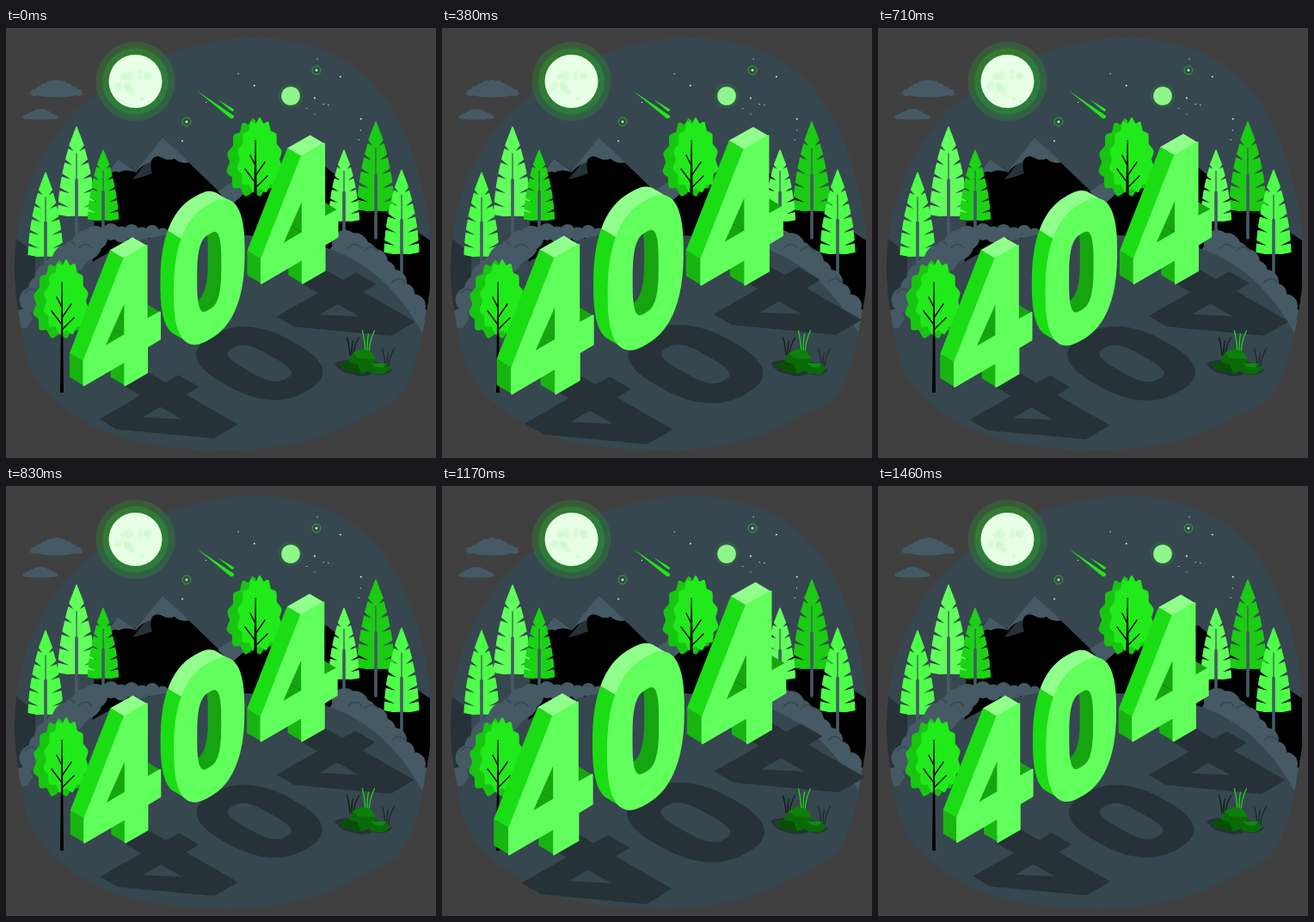
Write an HTML page that moves like this. It is 500x500 px and loops after 1500 ms.

```html
<!DOCTYPE html>
<html lang="en">
<head>
<meta charset="utf-8">
<title>404 night forest</title>
<style>
html, body { margin: 0; width: 100%; height: 100%; overflow: hidden; background: #404040; }
svg { display: block; width: 100vw; height: 100vh; }
</style>
</head>
<body>
<svg id="stage" viewBox="0 0 500 500"></svg>
<script>
const SLATE = '#37474f', MIST = '#455a64', DARK = '#263238';
const FRONT = '#61ff5c', SIDE = '#1bdd14', TOP = '#90ff8c', INNER = '#16a510', END = '#18b512';
const DEPTH = [-16.5, -9.8];
const ISO = 0.577;

const round = v => +v.toFixed(1);
const range = (count, fn) => Array.from({ length: count }, (_, i) => fn(i));
let seed = 7;
const rand = (lo, hi) => {
  seed = seed * 16807 % 2147483647;
  return lo + (hi - lo) * seed / 2147483647;
};

// Shape helpers
const poly = pts => 'M' + pts.map(p => p.map(round).join(' ')).join('L') + 'Z';
const pairs = s => s.split(' ').map(p => p.split(',').map(Number));
const path = (d, fill, extra = '') => `<path d="${d}" fill="${fill}" ${extra}/>`;
const line = (d, color, w) =>
  `<path d="${d}" fill="none" stroke="${color}" stroke-width="${w}" stroke-linecap="round"/>`;
const disc = (x, y, r, fill, extra = '') =>
  `<circle cx="${round(x)}" cy="${round(y)}" r="${round(r)}" fill="${fill}" ${extra}/>`;
const group = (x, y, body) => `<g transform="translate(${x} ${y})">${body}</g>`;

// Closed Catmull-Rom curve
function smooth(pts) {
  const at = i => pts[(i + pts.length) % pts.length];
  return 'M' + at(0) + pts.map((p, i) => {
    const a = at(i - 1), c = at(i + 1), e = at(i + 2);
    return 'C' + [p[0] + (c[0] - a[0]) / 6, p[1] + (c[1] - a[1]) / 6,
      c[0] - (e[0] - p[0]) / 6, c[1] - (e[1] - p[1]) / 6, c[0], c[1]].map(round);
  }).join('') + 'Z';
}

// Numerals: walls run from a front edge back along DEPTH
const wall = (pts, fill) =>
  path(poly([...pts, ...pts.map(p => [p[0] + DEPTH[0], p[1] + DEPTH[1]]).reverse()]), fill);
const face = (d, fill = FRONT) =>
  path(d, fill, `fill-rule="evenodd" stroke="${fill}" stroke-width="1.8" stroke-linejoin="round"`);

const outer = pairs('137,268 163.5,253 163.5,339 179,330.5 179,362 164,371 164,401 138,416 138,388 90,416 90,388');
const hole = pairs('138,317 138,357 114,371');
const fourFace = poly(outer) + poly(hole);

// Skewed superellipse used for both rims of the zero
function rimPoint(rim, deg) {
  const a = deg * Math.PI / 180;
  const bend = v => Math.sign(v) * Math.abs(v) ** (2 / rim.power);
  const x = rim.rx * bend(Math.cos(a));
  return [236.3 + x, 283.5 - ISO * x - rim.ry * bend(Math.sin(a))];
}
const rimArc = (rim, from, to) => range(Math.floor((to - from) / 3) + 1, i => rimPoint(rim, from + i * 3));

// Angle where a rim turns away from the depth direction
function tangent(rim, sign) {
  const reach = deg => {
    const p = rimPoint(rim, deg);
    return sign * (DEPTH[0] * p[1] - DEPTH[1] * p[0]);
  };
  return range(120, i => i * 3).reduce((best, a) => reach(a) > reach(best) ? a : best);
}

const outRim = { rx: 40.5, ry: 78, power: 2.5 }, inRim = { rx: 15, ry: 45, power: 3 };
const zeroFace = poly(rimArc(outRim, 0, 357)) + poly(rimArc(inRim, 0, 357));

function four() {
  return wall(hole.slice(0, 2), INNER) + wall(hole.slice(1), INNER) +
    wall([outer[8], outer[7]], END) + wall([outer[2], outer[3]], INNER) +
    wall([outer[0], outer[10]], SIDE) + wall([outer[10], outer[9]], END) +
    wall([outer[0], outer[1]], TOP) + face(fourFace);
}

function zero() {
  const up = tangent(outRim, 1), low = tangent(outRim, -1);
  return wall(rimArc(inRim, tangent(inRim, -1), tangent(inRim, 1) + 360), INNER) +
    wall(rimArc(outRim, 138, low), SIDE) + wall(rimArc(outRim, up, 138), TOP) + face(zeroFace);
}

// The fronts laid flat on the ground
function shadow() {
  return `<g transform="matrix(.593 -.8107 -.705 -.405 349.4 696.3)">${face(fourFace, DARK)}` +
    group(2.5, -5, face(zeroFace, DARK)) + group(207, -119, face(fourFace, DARK)) + '</g>';
}

// Conifer with slanted cuts, tip at (x, y)
function pine(x, y, h, hw, fill, trunk) {
  const width = u => hw * (0.05 + 0.95 * Math.sin(u * 1.5) ** 0.9);
  const right = range(5, i => {
    const u = (i + 1.3) / 6.3;
    return [[width(u), u * h], [width(u) * 0.18, (u + 0.085) * h], [width(u + 0.04), (u + 0.045) * h]];
  }).flat();
  right.push([hw, h * 0.985], [hw * 0.5, h * 1.005]);
  const left = right.map(p => [-p[0], p[1]]).reverse();
  return group(x, y, path(poly([[0, 0], ...right, [0, h], ...left]), fill,
    `stroke="${fill}" stroke-width="1.2" stroke-linejoin="round"`) +
    line(`M0 ${h * 0.3}V${trunk}`, MIST, 1.3) + line(`M0 ${h * 0.6}V${trunk}`, MIST, 3.6));
}

// Lobed broadleaf tree, crown top at (x, y)
function leafy(x, y, trunk) {
  const lobes = 13;
  const crown = smooth(range(lobes * 4, i => {
    const a = i / (lobes * 4) * 2 * Math.PI;
    const r = 1 + 0.07 * Math.cos(a * lobes);
    const low = (1 - Math.cos(a)) / 2;
    return [32 * r * Math.sin(a) * (0.72 + 0.34 * low), 44 - 43 * r * Math.cos(a)].map(round);
  }));
  return group(x, y, path(crown, '#17c611', 'transform="translate(-3 1)"') +
    path(crown, '#20ea19', 'transform="translate(5 0) scale(.86 .96)"') +
    line('M0 74L-12 58M0 66L11 50M0 54L-6 42M0 80L14 66', '#000', 1.4) +
    path(`M-.4 24H.6L2 ${trunk}H-2Z`, '#000'));
}

function sky() {
  const stars = range(16, i => disc(rand(205, 430), rand(30, 140), i % 3 ? 0.6 : 0.9, '#fff')).join('');
  const rings = [[210, 109], [361, 49]].map(([x, y]) =>
    disc(x, y, 5, 'none', 'stroke="#20b81b"') + disc(x, y, 1.5, '#b5ffb2')).join('');
  return stars + rings + disc(331, 79, 14.5, '#2c8c30', 'opacity=".25"') + disc(331, 79, 10.8, '#8df58a') +
    path('M222 73L265 102Q265.5 106 261 105Z', '#20e619') + path('M246 83L265 94.5Q265 98 262 96.6Z', '#20e619');
}

function moon(x, y) {
  const spots = range(12, () => {
    const a = rand(0, 6.28), d = rand(6, 23);
    return disc(x + d * Math.cos(a), y + d * Math.sin(a), rand(2, 6), '#cdf9cb', 'opacity=".6"');
  }).join('');
  return disc(x, y, 46, '#1fd318', 'opacity=".18"') + disc(x, y, 38.5, '#1fd318', 'opacity=".25"') +
    disc(x, y, 31, '#e6ffe5') + spots;
}

// Row of puffs that thins toward both ends
function cloud(x, y, w, h) {
  const puffs = range(9, i => {
    const u = (i + 1) / 10, r = h * (0.13 + 0.2 * Math.sin(u * Math.PI));
    return disc(x + u * w, y + h * (0.75 - 0.42 * Math.sin(u * Math.PI) ** 2), r, MIST);
  }).join('');
  return puffs + path(`M${x} ${y + h * 0.8}Q${x + w / 2} ${y + h * 0.2} ${x + w} ${y + h * 0.8}Q${x + w / 2} ${y + h * 1.15} ${x} ${y + h * 0.8}Z`, MIST);
}

function mountains() {
  return path('M100 290L104 185L130 152L152 167L182 127L262 204L285 182L372 162L410 192L493 247V345L380 275Z', '#000') +
    path('M108 181L130 152L153 168Q138 163 131 168Q122 163 108 181Z', MIST) +
    path('M147 176L172 146Q166 160 170 169Q158 174 147 176Z', DARK) +
    path('M147 172L182 127L213 156Q204 159 196 152Q188 155 182 151Q172 146 168 156Q156 160 147 172Z', MIST) +
    path('M246 190L268 176L300 172L262 206Z', MIST) +
    path('M8 242L34 262V330H8Z', DARK);
}

function bushes() {
  const left = range(9, i => {
    const t = i / 8;
    return disc(20 + 84 * t, 338 - 94 * t ** 0.7, 11 + 6 * Math.sin(t * 2.6) + i % 2 * 2, MIST);
  });
  const middle = range(6, i => disc(122 + 12 * i, 237 + i % 2 * 3, 10 - i * 0.5, MIST));
  const right = range(9, i => {
    const t = i / 8, y = 250 + 88 * t ** 1.4, r = 15 - 4 * t + i % 2 * 2;
    return disc(394 + 92 * t, y, r, MIST) + disc(390 + 85 * t, y + 14, r, MIST);
  });
  const shade = pairs('72,252 92,256 30,308 48,304 406,256 425,259 457,296').map(([x, y]) =>
    `M${x - 8} ${y}q8 -9 16 0`).join('');
  return left.join('') + middle.join('') + right.join('') + line(shade, SLATE, 1.6);
}

function rocks() {
  const blades = (x, y, color, tall) => line(range(3, i =>
    `M${x + i * 2} ${y}q${i - 1} -${tall * 0.6} ${(i - 0.7) * 5} -${tall - i % 2 * 4}`).join(''), color, 1.3);
  return path('M382 390Q392 383 415 388Q440 388 449 398Q440 407 427 402Q414 408 400 402Q390 402 382 390Z', DARK) +
    blades(400, 380, '#111a16', 20) + blades(441, 393, '#1d2a2c', 20) + blades(418, 378, '#1fd318', 26) +
    path('M387 391L398 388L403 378L414 373L424 376L430 385L428 396L413 402L396 398Z', '#0b6a08') +
    path('M403 378L414 373L424 376L430 385L409 384Z', '#0d8009') +
    path('M387 391L398 388L409 391L413 402L396 398Z', '#084f05') +
    path('M419 396L424 390L442 390L447 397L439 403L426 402Z', '#0b6a08') +
    path('M424 390L442 390L438 395L429 394Z', '#0e8c0a');
}

const blob = smooth(pairs('10,270 24,190 64,116 125,62 204,25 290,11 375,28 437,76 474,150 492,230 492,310 466,415 418,451 340,482 250,491 150,481 82,451 35,407 17,345'));
const hill = 'M0 400C25 325 100 238 222 238C300 241 350 246 385 260C430 278 468 318 493 372V500H0Z';

document.getElementById('stage').innerHTML = `
  <defs><clipPath id="land"><path d="${blob}"/></clipPath></defs>
  <rect width="500" height="500" fill="#404040"/>
  ${path(blob, SLATE)}${sky()}${moon(150.5, 62)}${cloud(26, 60, 65, 21)}${cloud(18, 94, 44, 13)}
  <g clip-path="url(#land)">${mountains()}</g>
  ${pine(82, 115, 103, 21.5, FRONT, 138)}${pine(113, 142, 81, 17.5, '#1bd314', 105)}
  ${pine(430, 109, 103, 21.5, '#1bcb14', 135)}${pine(393, 142, 82, 17.5, FRONT, 108)}
  ${pine(46, 168, 97, 20, '#4dff48', 125)}${pine(460, 165, 97, 20, '#4dff48', 125)}
  <g clip-path="url(#land)">${bushes()}${path(hill, SLATE)}</g>
  ${leafy(290, 106, 100)}${leafy(65, 271, 153)}
  <g id="shade">${shadow()}</g>
  ${rocks()}
  <g id="digits">${group(207, -119, four())}${zero()}${four()}</g>`;

// Two strong beats with a faint one between, stepped at 24 ticks per second
const LOOP = 1500, TICK = 1000 / 24;
const pulse = (tick, peak, width, height) => height * Math.max(0, 1 - Math.abs(tick - peak) / width);
const scaleAt = tick => 0.986 + Math.max(
  pulse(tick, 7.1, 8, 0.102), pulse(tick, 17.3, 3.6, 0.024), pulse(tick, 27.8, 7.2, 0.102));

const digits = document.getElementById('digits'), ground = document.getElementById('shade');
const zoom = (el, x, y, s) =>
  el.setAttribute('transform', `translate(${x} ${y}) scale(${s}) translate(${-x} ${-y})`);

function draw(ms) {
  const s = scaleAt(Math.floor((ms % LOOP + 4) / TICK) % 36);
  zoom(digits, 230, 270, s);
  zoom(ground, 291.5, 376, s);
}

const start = performance.now();
function loop() {
  draw(performance.now() - start);
  requestAnimationFrame(loop);
}
loop();
</script>
</body>
</html>
```
